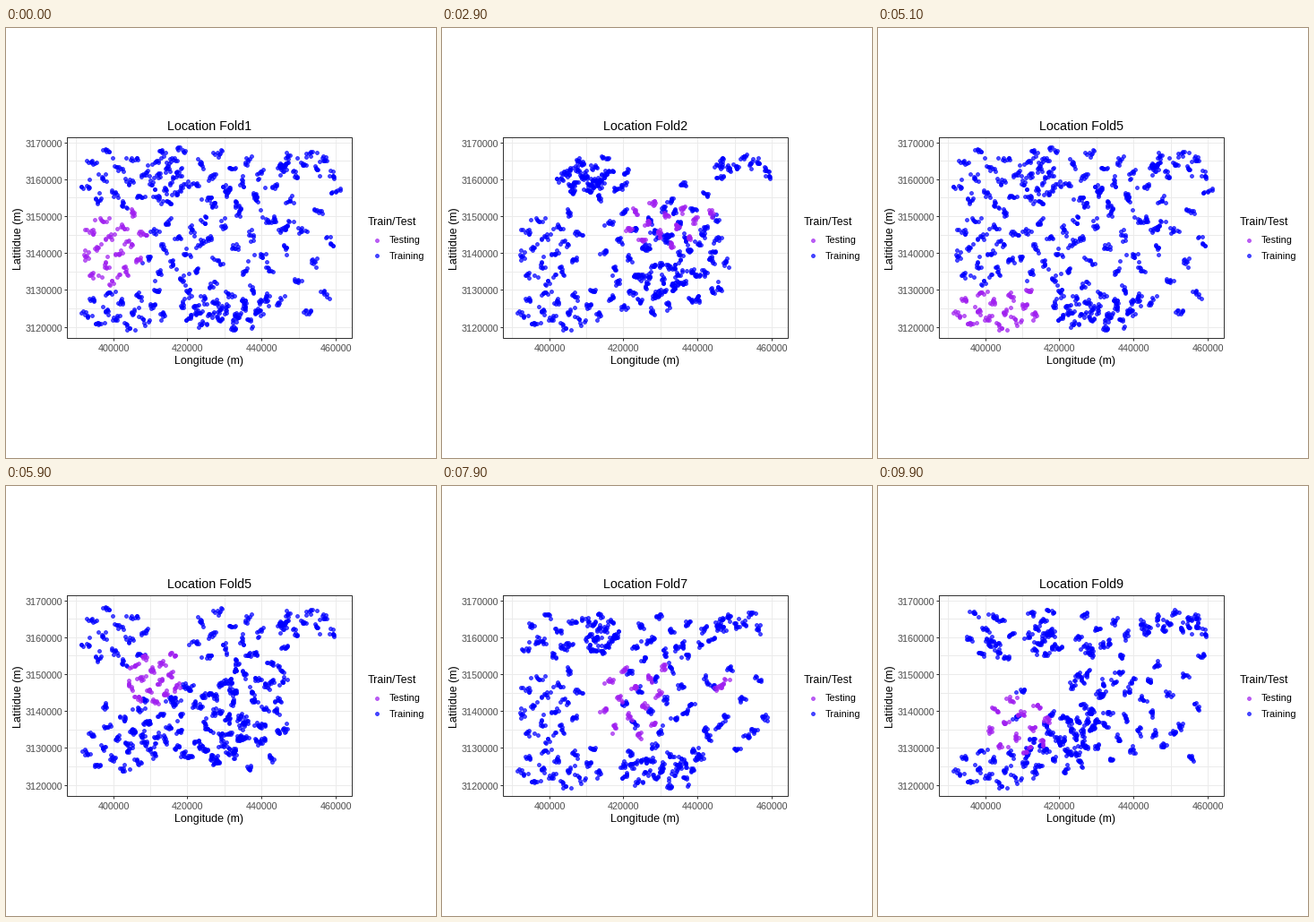
These frames come from a looping animation (480x480 px, 10 s). A matplotlib script:

```python
import matplotlib.pyplot as plt
import numpy as np
from matplotlib.animation import FuncAnimation

SIZE, DPI = 480, 72
FRAMES, INTERVAL = 100, 100
BLUE, PURPLE = "#0000FF", "#A020F0"
GRID, DARK, GREY = "#EBEBEB", "#333333", "#4D4D4D"
LEFT, RIGHT, TOP, BOTTOM = 68.5, 386.5, 122.5, 346.5
STATES = [1, 10, 2, 3, 4, 5, 6, 7, 8, 9]
PER_CLUMP = 8
GOLDEN = (5 ** 0.5 - 1) / 2

plt.rcParams["font.family"] = "Liberation Sans"
rng = np.random.default_rng(12)

# Fold, clump count, x range, y range. Row order matters: sites are paired
# by rank when the fold changes.
REGIONS = [
    (5, 14, (86, 178), (292, 336)),
    (1, 15, (87, 153), (207, 287)),
    (2, 13, (202, 290), (303, 336)),
    (8, 13, (157, 225), (210, 285)),
    (7, 13, (222, 300), (172, 275)),
    (7, 2, (308, 316), (216, 228)),
    (9, 12, (192, 295), (283, 325)),
    (10, 13, (290, 371), (178, 325)),
    (6, 14, (162, 200), (134, 198)),
    (4, 12, (87, 158), (134, 202)),
    (3, 12, (206, 288), (134, 200)),
    (3, 2, (304, 312), (151, 159)),
    (10, 8, (302, 368), (137, 166)),
]


def clump(centre):
    """A slim, randomly turned group of sites."""
    turn = rng.uniform(0, np.pi)
    axis = np.array([np.cos(turn), np.sin(turn)])
    normal = np.array([-axis[1], axis[0]])
    along = rng.normal(0, 3.6, (PER_CLUMP, 1))
    across = rng.normal(0, 1.6, (PER_CLUMP, 1))
    return centre + along * axis + across * normal


def region(count, xs, ys):
    """Spread clumps evenly, left to right, with golden-ratio heights."""
    k = np.arange(count)
    x = np.interp((k + 0.5) / count, [0, 1], xs)
    y = np.interp((k + 1) * GOLDEN % 1, [0, 1], ys)
    return np.vstack([clump(c) for c in np.column_stack([x, y])])


sites = np.vstack([region(*spec) for _, *spec in REGIONS])
sites = np.clip(sites, [83.5, 132.5], [372.5, 336.5])
folds = np.repeat([r[0] for r in REGIONS], [r[1] * PER_CLUMP for r in REGIONS])


def blend(old, new, t):
    """Move paired rows linearly; surplus old rows wait in place."""
    out = old.copy()
    n = min(len(old), len(new))
    out[:n] += t * (new[:n] - old[:n])
    return out


fig = plt.figure(figsize=(SIZE / DPI, SIZE / DPI), dpi=DPI, facecolor="white")
ax = fig.add_axes([0, 0, 1, 1])
ax.set(xlim=(0, SIZE), ylim=(SIZE, 0))
ax.axis("off")


def line(xs, ys, color, z=1):
    ax.plot(xs, ys, color=color, lw=1, snap=False, zorder=z,
            solid_capstyle="butt", solid_joinstyle="miter")


def label(x, y, text, size, color="black", ha="center", **kw):
    return ax.text(x, y, text, fontsize=size, color=color, ha=ha,
                   va=kw.pop("va", "baseline"), **kw)


def dots(color, xy, z):
    return ax.scatter(*np.transpose(xy), s=15.2, c=color, edgecolors=color,
                      linewidths=0.9, alpha=0.7, zorder=z)


for k in range(8):
    x = int(78.6 + 41.4 * k) + 0.5
    line([x, x], [TOP, BOTTOM], GRID)
    if k % 2:
        line([x, x], [BOTTOM, BOTTOM + 3], DARK)
        label(x, 361, str(390000 + 10000 * k), 10.8, GREY)
for k in range(11):
    y = int(128 + 20.62 * k) + 0.5
    line([LEFT, RIGHT], [y, y], GRID)
    if k % 2 == 0:
        line([LEFT - 3, LEFT], [y, y], DARK)
        label(63, y + 4.5, str(3170000 - 5000 * k), 10.8, GREY, "right")
line([LEFT, RIGHT, RIGHT, LEFT, LEFT], [TOP, TOP, BOTTOM, BOTTOM, TOP], DARK, 5)

title = label(227.5, 114, "", 14.3)
label(227, 375.5, "Longitude (m)", 12.5)
label(13.5, 235, "Latitidue (m)", 12.5, rotation=90, va="center")
label(404, 220, "Train/Test", 12.4, ha="left")
for y, name, color in [(236.5, "Testing", PURPLE), (253.5, "Training", BLUE)]:
    dots(color, [(413.5, y)], 3)
    label(428, y + 4, name, 10.9, ha="left")

train = dots(BLUE, sites, 2)
test = dots(PURPLE, sites, 3)


def draw(i):
    # Each state holds for five frames, then travels in sixths to the next.
    state, step = divmod(max(i, 1) - 1, 10)
    t = max(step - 4, 0) / 6
    old, new = STATES[state], STATES[(state + 1) % len(STATES)]
    train.set_offsets(blend(sites[folds != old], sites[folds != new], t))
    test.set_offsets(blend(sites[folds == old], sites[folds == new], t))
    title.set_text(f"Location Fold{old}")
    return train, test, title


anim = FuncAnimation(fig, draw, frames=FRAMES, interval=INTERVAL,
                     repeat=True, repeat_delay=0)
plt.show()
```
